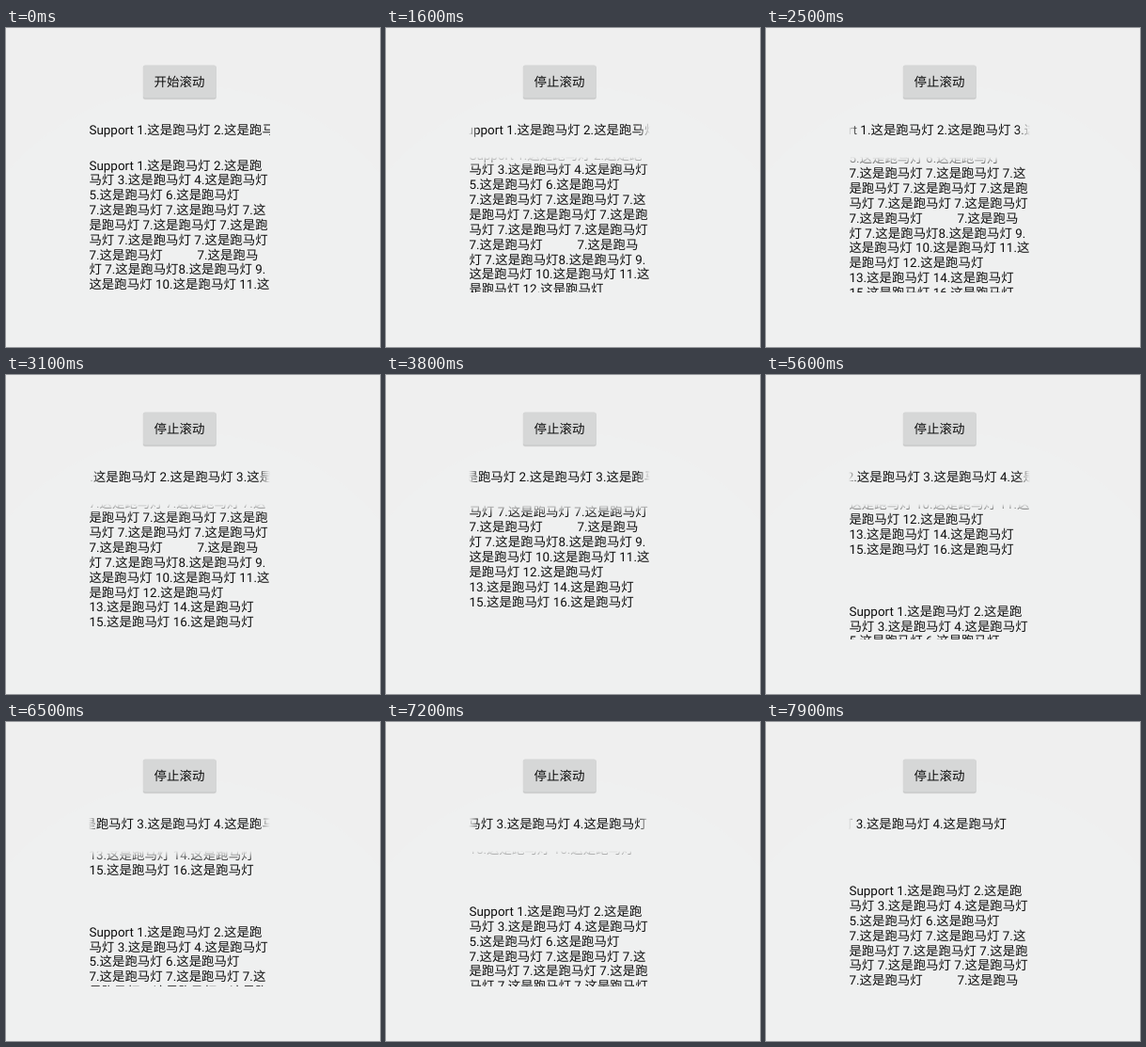
These frames come from a looping animation (398x339 px, 8000 ms). An HTML page:

```html
<!DOCTYPE html>
<html lang="zh-CN">
<head>
<meta charset="utf-8">
<title>跑马灯</title>
<style>
html, body { margin: 0; width: 100%; height: 100%; overflow: hidden; background: #efefef; }
svg { display: block; width: 398px; height: 339px; }
text {
  font: 13.46px Roboto, "Noto Sans CJK SC", "Noto Sans CJK", sans-serif;
  fill: #0d0d0d;
  white-space: pre;
  text-rendering: geometricPrecision;
}
</style>
</head>
<body>
<svg viewBox="0 0 398 339">
  <defs>
    <linearGradient id="fadeX" gradientUnits="userSpaceOnUse" x1="88" x2="281" y1="0" y2="0">
      <stop class="lead" offset="0" stop-color="#fff"/>
      <stop offset=".052" stop-color="#fff"/>
      <stop offset=".933" stop-color="#fff"/>
      <stop id="tail" offset="1" stop-color="#fff"/>
    </linearGradient>
    <linearGradient id="fadeY" gradientUnits="userSpaceOnUse" x1="0" x2="0" y1="137" y2="148">
      <stop class="lead" offset="0" stop-color="#fff"/>
      <stop offset="1" stop-color="#fff"/>
    </linearGradient>
    <mask id="rowMask" maskUnits="userSpaceOnUse" x="88" y="98" width="193" height="21">
      <rect x="88" y="98" width="193" height="21" fill="url(#fadeX)"/>
    </mask>
    <mask id="boxMask" maskUnits="userSpaceOnUse" x="88" y="137" width="193" height="144">
      <rect x="88" y="137" width="193" height="144" fill="url(#fadeY)"/>
    </mask>
  </defs>
  <rect width="398" height="339" fill="#efefef"/>
  <circle cx="199" cy="323" r="261" fill="#eff0f0"/>
  <rect x="145.5" y="39.8" width="78.5" height="36.4" rx="2.5" fill="#000" opacity=".06"/>
  <rect x="146" y="40" width="77.5" height="35.5" rx="2" fill="#c2c3c3"/>
  <rect x="146" y="39.5" width="77.5" height="35" rx="2" fill="#d6d7d7"/>
  <text id="label" x="184.5" y="62" text-anchor="middle"></text>
  <g mask="url(#rowMask)"><g id="row"></g></g>
  <g mask="url(#boxMask)"><g id="box"></g></g>
</svg>
<script>
const LOOP = 8000, START = 1200, STEP = 100;
const SPEED = 0.0311, LAG = 50;
const LEFT = 88.4, PITCH = 15.85, PERIOD = 240.5;

const $ = id => document.getElementById(id);
const item = n => n + ".这是跑马灯";
const items = (...list) => list.map(item).join(" ");

const lines = [
  "Support " + item(1) + " 2.这是跑",
  "马灯 " + items(3, 4),
  items(5, 6),
  items(7, 7) + " 7.这",
  "是跑马灯 " + item(7) + " 7.这是跑",
  "马灯 " + items(7, 7),
  item(7) + " ".repeat(11) + "7.这是跑马",
  "灯 " + item(7) + item(8) + " 9.",
  "这是跑马灯 " + item(10) + " 11.这",
  "是跑马灯 " + item(12),
  items(13, 14),
  items(15, 16)
];

function addText(parent, y, str) {
  const el = document.createElementNS("http://www.w3.org/2000/svg", "text");
  el.setAttribute("x", LEFT);
  el.setAttribute("y", y);
  el.textContent = str;
  parent.append(el);
}

addText($("row"), 113.1, "Support " + items(1, 2, 3, 4));
for (const top of [0, PERIOD])
  lines.forEach((str, i) => addText($("box"), 150.5 + top + i * PITCH, str));

const leads = document.querySelectorAll(".lead");

function draw(ms) {
  const t = Math.floor(ms / STEP) * STEP;
  const running = t >= START;
  const shift = Math.max(0, (t - START - LAG) * SPEED);
  $("label").textContent = running ? "停止滚动" : "开始滚动";
  $("row").setAttribute("transform", `translate(${-shift} 0)`);
  $("box").setAttribute("transform", `translate(0 ${-shift})`);
  // the leading fade grows with the scroll distance
  const lead = 1 - Math.min(1, shift / 10);
  leads.forEach(s => s.setAttribute("stop-opacity", lead));
  $("tail").setAttribute("stop-opacity", running ? 0 : 1);
}

const origin = performance.now();
function tick() {
  draw((performance.now() - origin) % LOOP);
  requestAnimationFrame(tick);
}
tick();
</script>
</body>
</html>
```
